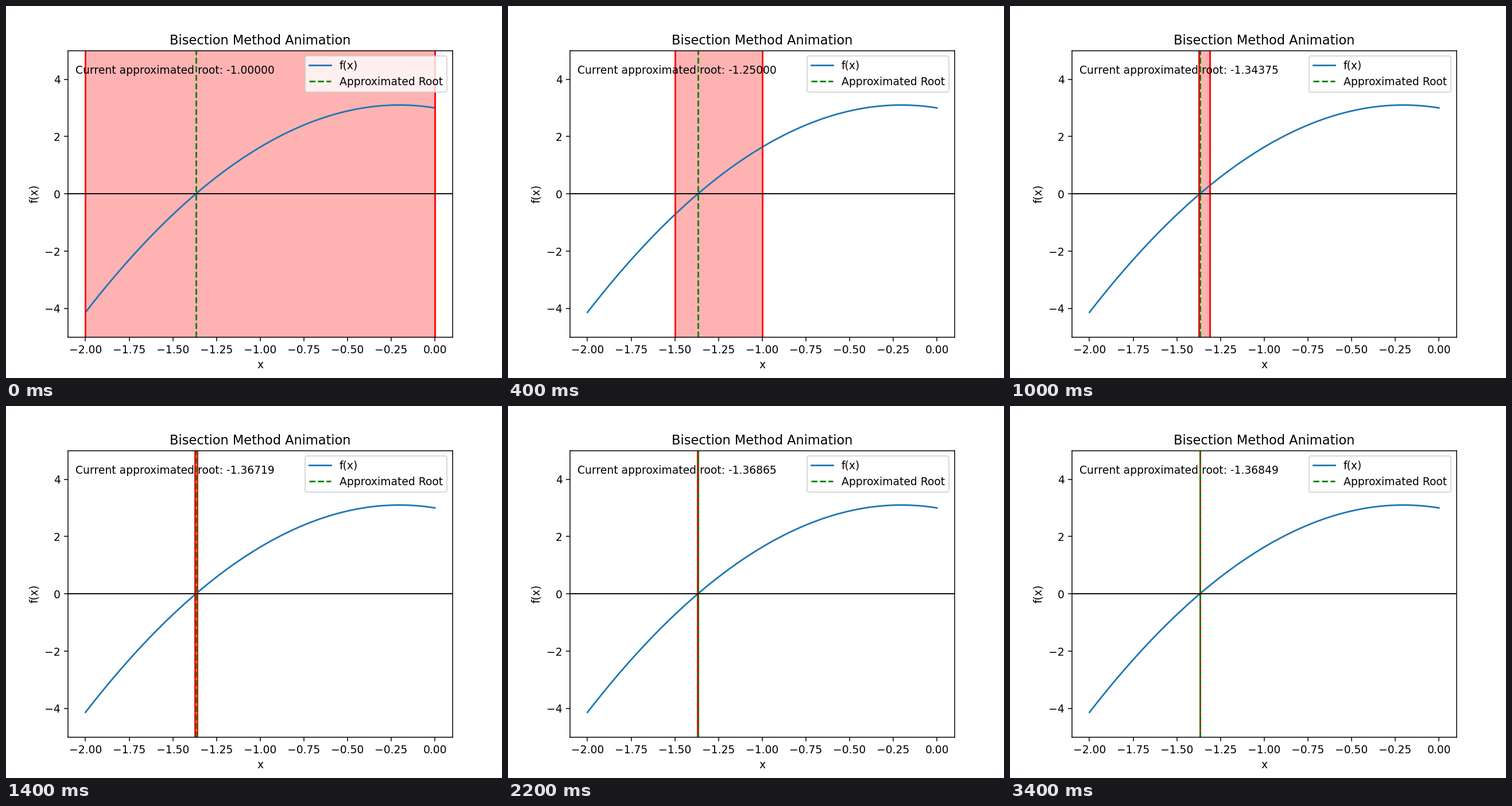
Recreate the animation shown at these times as a matplotlib script. Size 864 by 648 pixels, loop 3.6 s.

```python
import numpy as np
import matplotlib.pyplot as plt
from matplotlib.animation import FuncAnimation

STEPS = 18
INTERVAL = 200
START = (-2.0, 0.0)


def f(x):
    return 4 - 2 * x**2 - np.exp(x)


def bisect(a, b, steps):
    """Return the (left, right, middle) values of every bisection step."""
    history = []
    for _ in range(steps):
        mid = (a + b) / 2
        history.append((a, b, mid))
        if f(a) * f(mid) < 0:
            b = mid
        else:
            a = mid
    return history


history = bisect(*START, STEPS)
root = history[-1][2]

plt.rcParams["font.family"] = "DejaVu Sans"
fig, ax = plt.subplots(figsize=(6.4, 4.8), dpi=135)

x = np.linspace(*START, 400)
ax.plot(x, f(x), label="f(x)")
span = ax.axvspan(*START, color="red", alpha=0.3)
left = ax.axvline(START[0], color="red")
right = ax.axvline(START[1], color="red")
ax.axvline(root, color="green", linestyle="--", label="Approximated Root")
ax.axhline(0, color="black", linewidth=1)

ax.set_xlim(-2.1, 0.1)
ax.set_ylim(-5, 5)
ax.set_xlabel("x")
ax.set_ylabel("f(x)")
ax.set_title("Bisection Method Animation")
ax.legend(loc="upper right")
readout = ax.text(0.02, 0.92, "", transform=ax.transAxes)


def update(step):
    a, b, mid = history[step]
    span.set_x(a)
    span.set_width(b - a)
    left.set_xdata([a, a])
    right.set_xdata([b, b])
    readout.set_text(f"Current approximated root: {mid:.5f}")
    return span, left, right, readout


anim = FuncAnimation(fig, update, frames=STEPS, interval=INTERVAL,
                     repeat=True, repeat_delay=0)
plt.show()
```
